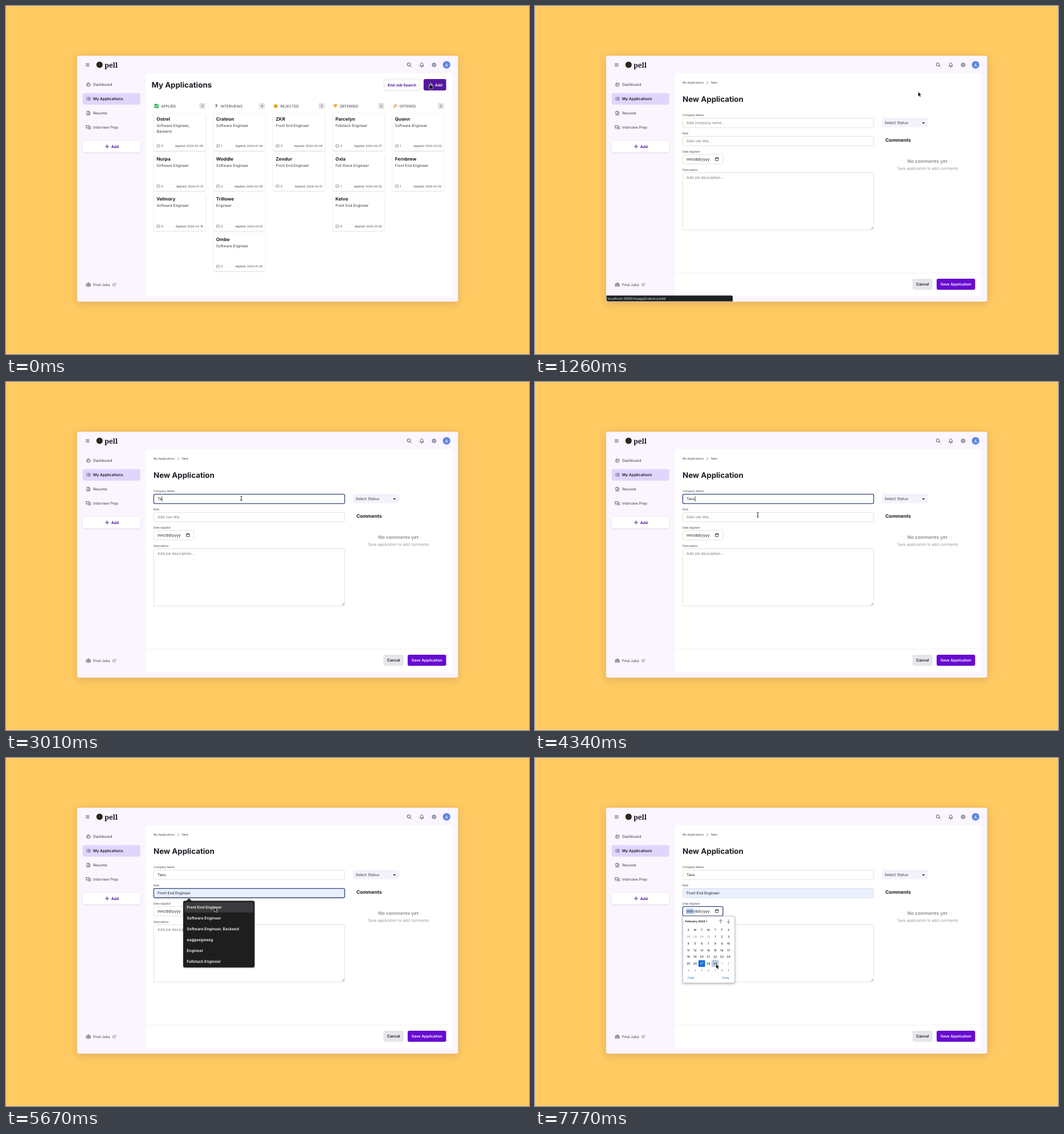
Write an HTML page with a canvas that moves like this. It is 918x610 px and loops after 8 s.

```html
<!DOCTYPE html>
<html lang="en">
<head>
<title>Job application tracker</title>
<style>
html, body { margin: 0; width: 100%; height: 100%; overflow: hidden; background: #ffca62; }
canvas { display: block; width: 918px; height: 610px; }
</style>
</head>
<body>
<canvas id="stage"></canvas>
<script>
const W = 918, H = 610, LOOP = 8000;
const canvas = document.getElementById('stage');
const dpr = window.devicePixelRatio || 1;
canvas.width = W * dpr;
canvas.height = H * dpr;
const ctx = canvas.getContext('2d');

const INK = '#1d1b22', SOFT = '#3b3842', HINT = '#77747e', PURPLE = '#660ad0', DEEP = '#4f179b';
const LINE = '#d6d5da', FOCUS = '#34467f', FILLED = '#e8f0fe';

// Moments of the story, in ms
const AT = { status: 210, form: 420, statusOff: 1400, company: 1960, typing: [2800, 2940, 3080, 3220],
  role: 4970, preview: 5250, pick: 5750, calendar: 6720 };
const COMPANY = 'Tavu', ROLE = 'Front End Engineer';

const COLUMNS = [
  ['APPLIED', [['Ostrel', 'Software Engineer,|Backend', 0, '02-09'], ['Nurpa', 'Software Engineer', 0, '01-31'],
    ['Velmory', 'Software Engineer', 0, '02-16']]],
  ['INTERVIEWS', [['Crateon', 'Software Engineer', 1, '01-26'], ['Woddle', 'Software Engineer', 2, '02-09'],
    ['Trillowe', 'Engineer', 0, '03-21'], ['Ombo', 'Software Engineer', 2, '01-26']]],
  ['REJECTED', [['ZKR', 'Front End Engineer', 0, '02-09'], ['Zendur', 'Front End Engineer', 0, '02-01']]],
  ['DEFERRED', [['Parcelyn', 'Fullstack Engineer', 2, '02-07'], ['Oxla', 'Full Stack Engineer', 1, '02-02'],
    ['Kelvo', 'Front End Engineer', 0, '01-26']]],
  ['OFFERED', [['Quonn', 'Software Engineer', 1, '02-03'], ['Fernbrew', 'Front End Engineer', 1, '02-02']]]
];
const COMPANY_TIPS = ['Fernbrew', 'Dolgrove Mobile', 'Woddle', 'Woddle', 'Ombo', 'Trillowe'];
const ROLE_TIPS = [ROLE, 'Software Engineer', 'Software Engineer, Backend', 'eaggaegwaeg', 'Engineer', 'Fullstack Engineer'];

// Pointer path: time, x, y
const PATH = [[0, 745, 136], [1050, 745, 136], [1750, 413, 204], [4060, 413, 204], [4340, 391, 233], [4620, 385, 238],
  [4970, 385, 238], [5040, 384, 250], [5400, 366, 262], [5850, 366, 262], [6440, 320, 267.5], [7070, 320, 267.5],
  [7700, 318, 361.5], [8000, 318, 361.5]];

function pointer(t) {
  const i = Math.max(1, PATH.findIndex(p => p[0] > t));
  const [t0, x0, y0] = PATH[i - 1], [t1, x1, y1] = PATH[i];
  const k = (t - t0) / (t1 - t0), e = k * k * (3 - 2 * k);
  return { x: x0 + (x1 - x0) * e, y: y0 + (y1 - y0) * e };
}

const inside = (p, x, y, w, h) => p.x >= x && p.x <= x + w && p.y >= y && p.y <= y + h;

function text(s, x, mid, size, color = SOFT, weight = 400, align = 'left', family = 'Inter, sans-serif') {
  ctx.font = `${weight} ${size}px ${family}`;
  ctx.textAlign = align;
  ctx.fillStyle = color;
  ctx.fillText(s, x, mid + size * 0.36);
}

function box(x, y, w, h, r, fill, stroke, lw = 0.7) {
  ctx.beginPath();
  ctx.roundRect(x, y, w, h, r);
  if (fill) { ctx.fillStyle = fill; ctx.fill(); }
  if (stroke) { ctx.strokeStyle = stroke; ctx.lineWidth = lw; ctx.stroke(); }
}

function shadowed(alpha, blur, dy, paint) {
  ctx.save();
  ctx.shadowColor = `rgba(40,20,60,${alpha})`;
  ctx.shadowBlur = blur * dpr;
  ctx.shadowOffsetY = dy * dpr;
  paint();
  ctx.restore();
}

function circle(x, y, r, fill, stroke, lw = 0.8) {
  ctx.beginPath();
  ctx.arc(x, y, r, 0, 7);
  if (fill) { ctx.fillStyle = fill; ctx.fill(); }
  if (stroke) { ctx.strokeStyle = stroke; ctx.lineWidth = lw; ctx.stroke(); }
}

// Paints an SVG path moved to x, y
function shape(d, x, y, fill, stroke, lw = 0.8) {
  const p = new Path2D(d);
  ctx.save();
  ctx.translate(x, y);
  ctx.lineCap = ctx.lineJoin = 'round';
  if (stroke) { ctx.strokeStyle = stroke; ctx.lineWidth = lw; ctx.stroke(p); }
  if (fill) { ctx.fillStyle = fill; ctx.fill(p); }
  ctx.restore();
}

const line = (d, x, y, color = SOFT, lw = 0.75) => shape(d, x, y, null, color, lw);
const plus = (x, y, color) => line('M-3 0H3M0-3V3', x, y, color, 1);

function topBar() {
  line('M-2.8-2.2H2.8M-2.8 0H2.8M-2.8 2.2H2.8', 143.2, 103.2, SOFT, 0.8);
  circle(164.2, 103, 5.6, '#33251c');
  text('pell', 173, 103.8, 12, '#17131a', 900, 'left', '"Noto Serif", serif');
  circle(707, 102.4, 2.8, null, SOFT, 0.9);
  line('M2.1 1.6L4.3 3.8', 707, 102.8, SOFT, 0.9);
  line('M-3 2C-2 1-2.2-.5-2-1.5C-1.6-4.2 1.6-4.2 2-1.5C2.2-.5 2 1 3 2ZM-.8 3.6H.8', 729.8, 103, SOFT, 0.9);
  circle(751.4, 103.2, 1.2, null, SOFT, 0.8);
  circle(751.4, 103.2, 3, null, SOFT, 0.8);
  for (let i = 0; i < 8; i++) {
    const a = i * Math.PI / 4;
    circle(751.4 + 3.5 * Math.cos(a), 103.2 + 3.5 * Math.sin(a), 0.55, SOFT);
  }
  circle(773.3, 103.1, 6.7, '#5f89e4');
  text('A', 773.3, 103.2, 6.4, '#fff', 500, 'center');
}

function sideBar() {
  circle(144.7, 137.8, 3.2, null, SOFT, 0.8);
  line('M-.8.8L1.2-1.2M-1.8.5A2 2 0 0 1 0-1.6', 144.7, 137.8, SOFT, 0.7);
  text('Dashboard', 153, 137.6, 6.5);
  box(134.5, 152.7, 101, 20, 3, '#e1d4fd');
  line('M-3-2.2H-2.4M-3 0H-2.4M-3 2.2H-2.4M-.8-2.2H3.2M-.8 0H3.2M-.8 2.2H3.2', 144.7, 162.6, SOFT, 0.85);
  text('My Applications', 153, 162.6, 6.7, INK, 600);
  line('M-2.4-3.3H.8L2.4-1.6V3.3H-2.4ZM.6-3.2V-1.5H2.3M-1 1.8A1 1 0 0 1 1 1.8', 144.7, 187.8);
  circle(144.7, 187.8, 0.6, SOFT);
  text('Resume', 153, 187.8, 6.5);
  line('M-3.6-3H1.4V.6H-1.4L-2.8 2V.6H-3.6ZM2.2-1H4V2.6H3.2V3.6L2 2.6H-.2V1.4', 144.5, 212.6);
  text('Interview Prep', 153, 212.8, 6.45);
  shadowed(0.16, 3, 0.8, () => box(134.8, 236, 100.6, 20.4, 3, '#fff'));
  plus(177.4, 246.3, DEEP);
  text('Add', 184.7, 246.3, 6.6, DEEP, 700);
  line('M-3.2-1.5H3.2V2.8H-3.2ZM-1.2-1.6V-3H1.2V-1.6M-3.2.5H3.2M-.5.5V1.2H.5V.5', 144.7, 488.5);
  text('Find Jobs', 153, 488.5, 6.4);
  line('M-.2-1.6H-2.4V2.2H1.4V.2M-.4.2L2.5-2.5M.8-2.5H2.5V-.8', 190, 488.7, HINT, 0.65);
}

function statusIcon(i, x, y) {
  if (i === 0) {
    box(x - 3.6, y - 3.6, 7.2, 7.2, 1, '#27b34a');
    line('M-2 .2L-.6 1.8L2.1-1.9', x, y, '#fff', 1.1);
  } else if (i === 1) {
    text('?', x + 0.2, y, 7.4, INK, 700, 'center');
  } else if (i === 2) {
    circle(x, y, 3.5, '#f6bd3c');
    circle(x - 1.2, y - 0.6, 0.5, '#62401e');
    circle(x + 1.2, y - 0.6, 0.5, '#62401e');
    line('M-1.6 1.6H1.6', x, y, '#62401e', 0.8);
  } else if (i === 3) {
    shape('M-3.4-2.6H-1.4L-.4-3.4H2.2Q3.4-3 3.3-1.4Q3.4.5 2.2.6H.6L.9 2.6Q.5 4-.5 3L-1.6.6L-3.4.2Z', x, y, '#f0b030');
  } else {
    shape('M-3.5 3.6L-1.4-1.6L1.7 1.4Z', x, y, '#eab03a');
    line('M0-1.2Q1.4-2 .4-3.4M1.4.2Q2.4-.8 3.4 0', x, y, '#d0503f', 0.8);
    line('M.9-.6L3.1-3', x, y, '#9a6b2e', 0.8);
    circle(x - 1.8, y - 3, 0.5, '#4a86cf');
    circle(x + 3.1, y + 2, 0.5, '#c84c9b');
  }
}

function card(x, y, [name, role, notes, date]) {
  shadowed(0.22, 1.8, 0.6, () => box(x, y, 91, 65.6, 2.5, '#fff'));
  text(name, x + 4.7, y + 9.6, 8.1, INK, 700);
  role.split('|').forEach((s, i) => text(s, x + 4.7, y + 21 + i * 10.1, 6.5));
  line('M-2.6-1.8Q-2.6-2.2-2-2.2H2Q2.6-2.2 2.6-1.6V.8Q2.6 1.4 2 1.4H-.4L-1.5 2.5V1.4H-2Q-2.6 1.4-2.6.8Z', x + 8, y + 57.4, SOFT, 0.55);
  text(notes, x + 13.2, y + 57.4, 5.1);
  text('Applied: 2024-' + date, x + 86.4, y + 57.4, 4.9, SOFT, 400, 'right');
}

function listPage() {
  text('My Applications', 255.5, 138.6, 13.3, INK, 700);
  shadowed(0.08, 1.5, 0.5, () => box(663.5, 128, 63, 20, 3, '#fff', '#e3dfea'));
  text('End Job Search', 695, 138.2, 6.6, DEEP, 700, 'center');
  box(733, 128, 39.6, 20, 3, '#55179f');
  plus(745.8, 138.2, '#fff');
  text('Add', 753, 138.2, 6.6, '#fff', 600);
  COLUMNS.forEach(([label, cards], i) => {
    const x = 259.5 + i * 104.65;
    statusIcon(i, x + 4.6, 175.3);
    text(label, x + 12.7, 175.3, 6.3);
    box(x + 80, 170, 10.4, 10.4, 2, '#e2e1e5');
    text(cards.length, x + 85.2, 175.2, 5.2, SOFT, 400, 'center');
    cards.forEach((c, row) => card(x, 188.2 + row * 70.35, c));
  });
}

function field(y, h, w, value, hint, { focus = false, fill = '#fff', caret = false } = {}) {
  box(259.3, y, w, h, 2.5, fill, focus ? FOCUS : LINE, focus ? 1.3 : 0.7);
  const mid = y + Math.min(h, 17) / 2;
  text(value || hint, 266, mid, 6.45, value ? INK : HINT);
  if (caret) {
    const x = 266.2 + (value ? ctx.measureText(value).width + 0.3 : 0);
    line('M0-4.2V4.2', x, mid, INK, 0.8);
  }
}

function tips(items, y, w, hover) {
  shadowed(0.25, 3, 1, () => box(311, y, w, 117, 3, '#1e1e1e'));
  shape('M-5 .5L-.8-3.6Q0-4.2.8-3.6L5 .5Z', 321.2, y, '#1e1e1e');
  if (hover) box(313, y + 2.6, w - 4, 18, 2.5, '#3a3a3c');
  items.forEach((s, i) => text(s, 317.2, y + 11.8 + i * 18.82, 6.75, '#f4f4f5', 600));
}

function calendar(p) {
  shadowed(0.35, 4, 1.5, () => box(259.3, 277.3, 91.4, 117, 1, '#fff'));
  box(259.3, 277.3, 91.4, 117, 1, null, '#a9a9ad', 0.6);
  text('February 2024', 263.6, 286.2, 4.8, INK, 700);
  shape('M-1.5-.8H1.5L0 1Z', 301, 286.2, INK);
  line('M0 3V-3M-2.6-.5L0-3L2.6-.5', 326, 286.4, '#555', 0.8);
  line('M0-3V3M-2.6.5L0 3L2.6.5', 339.6, 286.4, '#555', 0.8);
  const cx = c => 269.2 + c * 11.75;
  [...'SMTWTFS'].forEach((s, c) => text(s, cx(c), 301.4, 4.8, INK, 500, 'center'));
  const hc = Math.floor((p.x - 263.3) / 11.75), hr = Math.floor((p.y - 307.6) / 11.7);
  for (let i = 0; i < 42; i++) {
    const c = i % 7, r = Math.floor(i / 7), y = 313.4 + r * 11.7;
    const day = i < 4 ? 28 + i : i < 33 ? i - 3 : i - 32;
    const current = i >= 4 && i < 33, chosen = current && day === 27;
    if (chosen) box(cx(c) - 5.8, y - 5.8, 11.6, 11.6, 1, '#0f6bdc');
    else if (c === hc && r === hr) box(cx(c) - 5.6, y - 5.6, 11.2, 11.2, 1, '#bed2ec', '#8fa6c6', 0.6);
    text(day, cx(c), y, 5, chosen ? '#fff' : current ? INK : '#85858a', current ? 500 : 400, 'center');
  }
  text('Clear', 268, 385.2, 4.8, '#1f5fb8');
  text('Today', 341, 385.2, 4.6, '#1f5fb8', 400, 'right');
}

function formPage(t, p) {
  const typed = AT.typing.filter(k => t >= k);
  const onCompany = t >= AT.company && t < AT.role;
  const onRole = t >= AT.role && t < AT.calendar;
  const picking = t >= AT.calendar;
  const blink = since => (t - since) % 1000 < 490;

  text('My Applications', 259, 134.4, 4.9);
  line('M-1-1.7L.8 0L-1 1.7', 302.7, 134.6, SOFT, 0.7);
  text('New', 309, 134.4, 5.1);
  text('New Application', 259, 163.6, 13.3, INK, 700);
  [['Company Name', 191.3], ['Role', 223.2], ['Date Applied', 255.1], ['Description', 287]]
    .forEach(([s, y]) => text(s, 259, y, 4.9));

  field(196.6, 16.6, 335.2, COMPANY.slice(0, typed.length), 'Add company name...',
    { focus: onCompany, caret: onCompany && blink(typed.length ? typed[typed.length - 1] : AT.company) });
  const filled = t >= AT.preview;
  field(228.6, 16.4, 335.2, filled ? ROLE : '', 'Add role title...',
    { focus: onRole, fill: filled ? FILLED : '#fff', caret: onRole && !filled && blink(AT.role) });

  box(259.3, 260.3, 70.6, 16.6, 2.5, '#fff', picking ? FOCUS : LINE, picking ? 1.3 : 0.7);
  if (picking) box(265.4, 263.8, 12.8, 9.6, 0, '#b3cdf5');
  text('mm/dd/yyyy', 266, 268.4, 6.85, INK);
  line('M-2.4-2H2.4V2.6H-2.4ZM-1.4-2.8V-2M1.4-2.8V-2', 319.4, 268.3, INK, 0.8);
  line('M-2.2-1.5H2.2', 319.4, 268.3, INK, 1.1);

  field(292.2, 100.2, 335.2, '', 'Add job description...');
  line('M-3.8 0L0-3.8M-1.6 0L0-1.6', 593.3, 391.2, '#77777c', 0.7);

  box(609, 196, 80.8, 16.4, 2.5, '#f4f2fb');
  text('Select Status', 613.4, 204.2, 6.75);
  shape('M-2.5-1.1H2.5L0 1.5Z', 681.8, 205, INK);
  text('Comments', 615, 234.8, 8.45, INK, 700);
  text('No comments yet', 688.7, 271.8, 8.3, '#8c8a91', 600, 'center');
  text('Save application to add comments', 689, 284.8, 6.6, '#918f96', 400, 'center');

  line('M245.5 468H783', 0, 0, '#efedf2', 0.8);
  box(662.5, 478, 35.6, 19.4, 3, '#e7e6e9');
  text('Cancel', 680.3, 487.9, 6.75, INK, 600, 'center');
  box(705, 478, 67.6, 19.4, 3, PURPLE);
  text('Save Application', 738.8, 487.9, 6.7, '#fff', 600, 'center');

  if (t >= AT.company && !typed.length) tips(COMPANY_TIPS, 218.2, 81.4, false);
  if (t >= AT.role && t < AT.pick) tips(ROLE_TIPS, 250.2, 125.4, filled);
  if (picking) calendar(p);
}

function cursor(t, p) {
  const overTips = t >= AT.role && t < AT.pick && inside(p, 311, 249, 126, 118);
  const overDates = t >= AT.calendar && inside(p, 259, 277, 92, 118);
  const overField = inside(p, 259, 196, 336, 18) || inside(p, 259, 228, 336, 18) || inside(p, 259, 292, 336, 101);
  if (t < AT.form) {
    shape('M-.8 1V-3.2Q0-4.6.8-3.2V-.6Q1.8-1.2 2.2-.3Q3-.8 3.3.2Q4.2 0 4.2 1V3Q3.8 4.6 3.2 5.2H-.4Q-1.6 3.8-3 1.8Q-2.8.4-1.6 1.2Z',
      p.x, p.y + 4, '#111', '#fff', 1.1);
  } else if (overField && !overTips && !overDates) {
    line('M-1.7-4Q-.3-4 0-3.2Q.3-4 1.7-4M0-3.4V3.4M-1.7 4Q-.3 4 0 3.2Q.3 4 1.7 4M-1 .9H1', p.x, p.y + 0.2, INK, 0.8);
  } else {
    shape('M0 0V7.2L1.7 5.7L2.9 8.4L4.1 7.9L2.9 5.2H5.2Z', p.x, p.y, '#0c0c0c', '#fff', 1.1);
  }
}

function draw(t) {
  const p = pointer(t);
  ctx.setTransform(dpr, 0, 0, dpr, 0, 0);
  ctx.textRendering = 'geometricPrecision';
  ctx.fillStyle = '#ffca62';
  ctx.fillRect(0, 0, W, H);
  shadowed(0.16, 14, 3, () => box(124.8, 87.2, 668.8, 431, 3, '#faf5ff'));
  topBar();
  sideBar();
  box(245.4, 117.4, 538, 390.6, 6, '#fff');
  if (t < AT.form) listPage();
  else formPage(t, p);
  if (t >= AT.status && t < AT.statusOff) {
    box(125.4, 507.6, 221.6, 10.2, [0, 2, 0, 3], '#1b2022');
    text('localhost:3000/myapplications/add', 127.2, 512.9, 6.1, '#dfe2e4');
  }
  cursor(t, p);
}

const start = performance.now();
function tick() {
  draw((performance.now() - start) % LOOP);
  requestAnimationFrame(tick);
}
tick();
</script>
</body>
</html>
```
